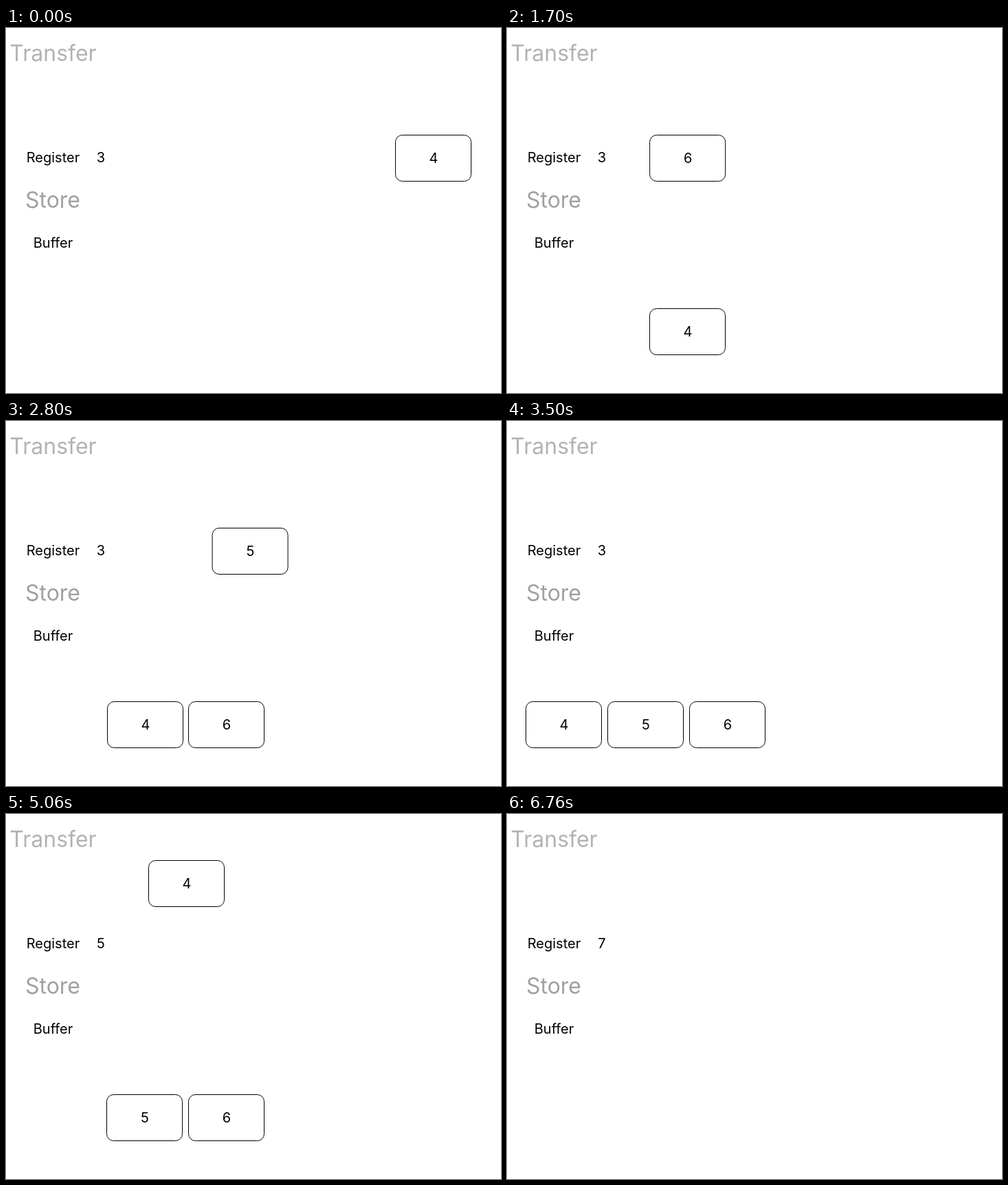
Animation of 720 by 530 pixels, one loop 6780 ms. Source, as an HTML page:

```html
<!DOCTYPE html>
<html lang="en">
<head>
<meta charset="utf-8">
<title>Ordered transfer</title>
<style>
  html, body { margin: 0; width: 100%; height: 100%; overflow: hidden; background: #fff; }
  svg { display: block; }
  text { font: 20px Inter, sans-serif; text-anchor: middle; }
  .title { font-size: 32px; }
  .box rect { fill: #fff; stroke: #000; }
  .mark { fill: none; stroke-width: 5; stroke-linecap: round; stroke-linejoin: round; opacity: 0; }
</style>
</head>
<body>
<svg id="stage" width="720" height="530" viewBox="0 0 720 530">
  <text class="title" x="68.5" y="48" fill="#b3b3b3">Transfer</text>
  <text x="68.5" y="195">Register</text>
  <text id="register" x="138" y="195">3</text>
  <text class="title" x="68" y="261" fill="#a0a0a0">Store</text>
  <text x="68.5" y="319">Buffer</text>
  <path id="cross" class="mark" stroke="#f08a84" d="M167 180Q181 199 201 221M200 179Q183 196 167 220"/>
  <path id="check" class="mark" stroke="#8fd197" d="M162.5 189Q170 203 177.5 206.5Q184 184 201.5 176.5"/>
</svg>
<script>
const LOOP = 6780, ENTER = 640, STEP = 250, FADE = 40;
const PORT = 207, LANE = 155, SHELF = 407, TOP = 2;

// Each move: start, duration, x, y. Every packet enters from the right.
const packets = [
  { label: 4, moves: [[0, ENTER, PORT, LANE], [798.6, STEP, PORT, SHELF], [2165, 210, 147, SHELF],
    [3237, STEP, 27, SHELF], [4404, 130, PORT, SHELF], [4534, STEP, PORT, LANE], [4923, STEP, PORT, TOP]] },
  { label: 6, moves: [[1068, ENTER, PORT, LANE], [1912, STEP, PORT, SHELF], [2165, 210, 265, SHELF],
    [5942, 90, PORT, SHELF], [6032, STEP, PORT, LANE], [6461, STEP, PORT, TOP]] },
  { label: 5, moves: [[2377, ENTER, PORT, LANE], [3237, STEP, 146, SHELF],
    [5173, 90, PORT, SHELF], [5263, STEP, PORT, LANE], [5692, STEP, PORT, TOP]] },
  { label: 3, moves: [[3513, ENTER, PORT, LANE], [4154, STEP, PORT, TOP]] }
];
const misses = [[645, 150], [1708, 200], [3018, 215]];
const hits = [[4154, 190], [4784, 139], [5513, 179], [6282, 179]];

const stage = document.getElementById("stage");
const register = document.getElementById("register");
const cross = document.getElementById("cross");
const check = document.getElementById("check");

const clamp = v => Math.min(1, Math.max(0, v));
const ease = v => (1 - Math.cos(Math.PI * clamp(v))) / 2;

function addNode(parent, tag, attrs) {
  const node = document.createElementNS("http://www.w3.org/2000/svg", tag);
  for (const key in attrs) node.setAttribute(key, attrs[key]);
  return parent.appendChild(node);
}

for (const p of packets) {
  p.node = addNode(stage, "g", { class: "box" });
  addNode(p.node, "rect", { x: 0.5, y: 0.5, width: 110, height: 67, rx: 10 });
  addNode(p.node, "text", { x: 56, y: 41 }).textContent = p.label;
}

function placePacket({ node, moves }, t) {
  let x = 566, y = LANE;
  for (const [start, span, toX, toY] of moves) {
    const k = ease((t - start) / span);
    x += (toX - x) * k;
    y += (toY - y) * k;
  }
  const [lastStart, lastSpan] = moves[moves.length - 1];
  const alpha = t < moves[0][0] ? 0 : 1 - clamp((t - lastStart - lastSpan) / FADE);
  node.setAttribute("transform", `translate(${x} ${y})`);
  node.style.opacity = alpha;
}

function showMark(node, spans, t) {
  const levels = spans.map(([start, span]) => clamp(Math.min(t - start, start + span - t) / FADE));
  node.style.opacity = Math.max(...levels);
}

function draw(t) {
  for (const p of packets) placePacket(p, t);
  showMark(cross, misses, t);
  showMark(check, hits, t);
  register.textContent = 3 + hits.filter(([start]) => t >= start).length;
}

let origin;
function tick(now) {
  origin ??= now;
  draw((now - origin) % LOOP);
  requestAnimationFrame(tick);
}
draw(0);
requestAnimationFrame(tick);
</script>
</body>
</html>
```
